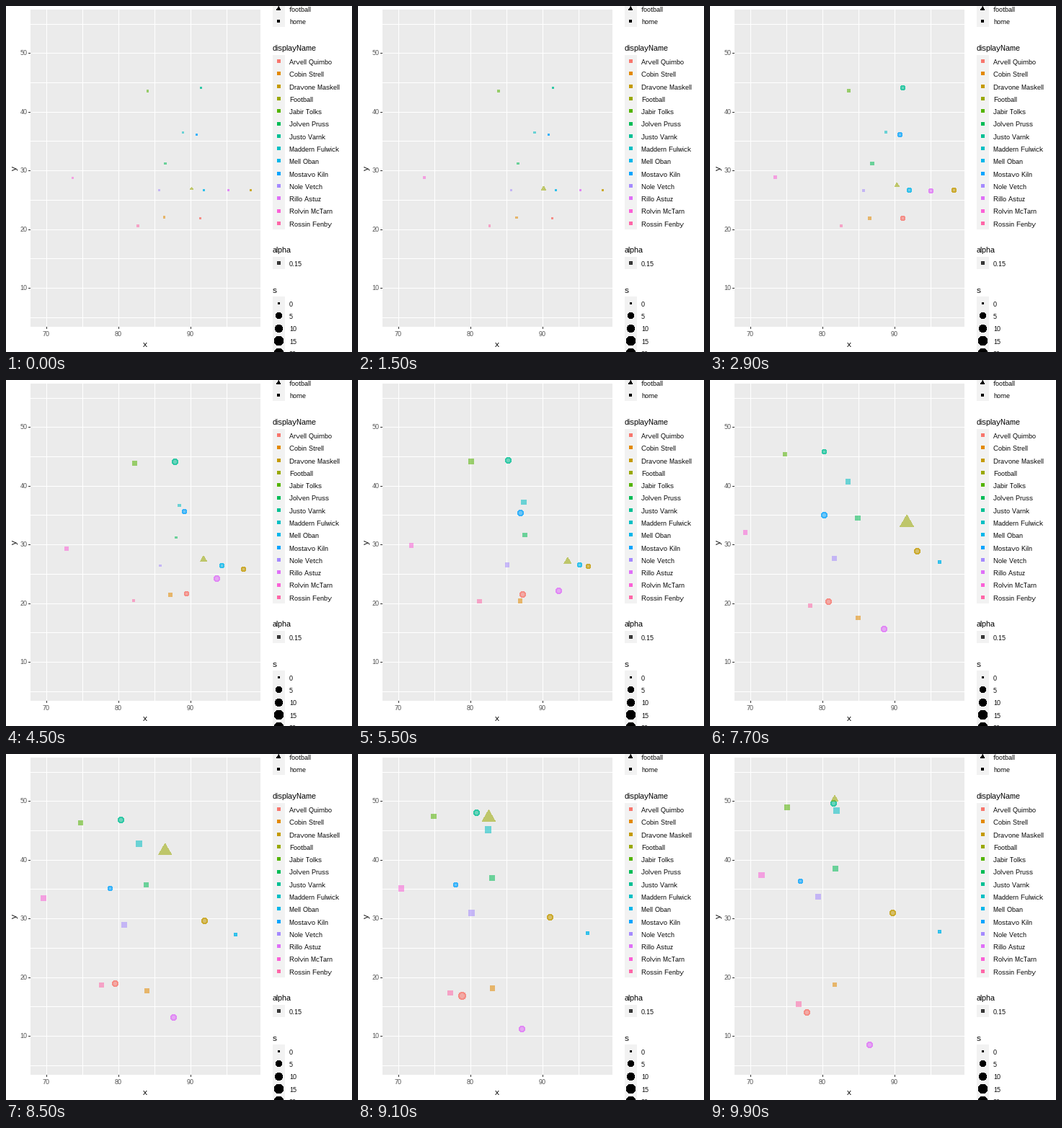
Animation of 480 by 480 pixels, one loop 10000 ms. Source, as a matplotlib script:

```python
import numpy as np
import matplotlib.pyplot as plt
from matplotlib.animation import FuncAnimation
from matplotlib.patches import Circle, Polygon, Rectangle
from matplotlib.transforms import Affine2D

plt.rcParams.update({"font.family": "Liberation Sans",
                     "text.hinting": "native", "text.hinting_factor": 1})

SIZE, DPI = 480, 80
PX = 72 / DPI              # points per pixel
STEPS = 50                 # motion steps in one loop
TOP_SPEED = 23             # speed drawn at the largest size
YARD = np.array([10, 8.14])  # pixels per yard along x and y

fig = plt.figure(figsize=(SIZE / DPI, SIZE / DPI), dpi=DPI, facecolor="white")
ax = fig.add_axes([0, 0, 1, 1])
ax.set(xlim=(0, SIZE), ylim=(SIZE, 0))
ax.axis("off")

COLORS = ["#F8766D", "#E38900", "#C49A00", "#99A800", "#53B400",
          "#00BC56", "#00C094", "#00BFC4", "#00B6EB", "#06A4FF",
          "#A58AFF", "#DF70F8", "#FB61D7", "#FF66A8"]

# Each route: line-up, break, cut and finish
START, KEYS = 13, [23, 40, 50]
PLAYERS = [
    ("Arvell Quimbo", "away", (269, 294), (250, 296), (161, 309), (134, 358)),
    ("Cobin Strell", "home", (219.5, 293), (228, 298), (203.5, 330), (173, 320)),
    ("Dravone Maskell", "away", (339, 255), (329, 262), (285, 236), (253, 220)),
    ("Football", "football"),
    ("Jabir Tolks", "home", (196.5, 118), (178.5, 115.5), (103, 102), (107, 74)),
    ("Jolven Pruss", "home", (221, 218.5), (236, 218.5), (202.5, 189.5), (174, 159)),
    ("Justo Varnk", "away", (270, 113), (234, 113), (158, 98), (171, 68)),
    ("Maddern Fulwick", "home", (245.5, 175.5), (240.5, 174), (189.5, 138), (175.5, 78.5)),
    ("Mell Oban", "away", (274, 255), (299, 257), (319, 252), (318, 246)),
    ("Mostavo Kiln", "away", (264, 178), (247, 182), (154, 188), (125, 176)),
    ("Nole Vetch", "home", (212.5, 255.5), (214, 257.5), (170, 246), (150, 198)),
    ("Rillo Astuz", "away", (308, 255), (292, 275), (239, 350), (221, 403)),
    ("Rolvin McTarn", "home", (92.5, 238.5), (84, 234), (48.5, 209.5), (71.5, 168)),
    ("Rossin Fenby", "home", (183, 305), (177, 306), (137, 314), (123, 347)),
]
PASSER, RECEIVER = "Mell Oban", "Justo Varnk"
SPOT, SNAP, HELD, THROW, CATCH = (257.5, 253.5), 8, 33, 35.5, 47


def glide(keys, points):
    """Monotone cubic path through the points, sampled at every step."""
    t, p = np.array(keys, float), np.array(points, float)
    h = np.diff(t)[:, None]
    d = np.diff(p, axis=0) / h
    m = np.vstack([d[:1], np.zeros_like(d[1:]), d[-1:]])
    a, b = 2 * h[1:] + h[:-1], h[1:] + 2 * h[:-1]
    same = d[:-1] * d[1:] > 0
    d0, d1 = np.where(same, d[:-1], 1), np.where(same, d[1:], 1)
    m[1:-1] = np.where(same, (a + b) / (a / d0 + b / d1), 0)

    s = np.arange(STEPS + 1)
    k = np.clip(np.searchsorted(t, s, "right") - 1, 0, len(h) - 1)
    u = (s - t[k])[:, None] / h[k]
    return ((1 + 2 * u) * (1 - u) ** 2 * p[k] + u * (1 - u) ** 2 * h[k] * m[k]
            + u * u * (3 - 2 * u) * p[k + 1] + u * u * (u - 1) * h[k] * m[k + 1])


def route(team, points):
    # Attackers wait for the snap, defenders drift a little
    p = np.array(points, float)
    drift = 0.15 if team == "home" else 0
    ready = p[0] + drift * (p[1] - p[0])
    return glide([0, START] + KEYS, np.vstack([p[:1], [ready], p[1:]]))


def ball_path(passer, receiver):
    s = np.arange(STEPS + 1)
    u = np.clip((s - SNAP) / (HELD - SNAP), 0, 1)[:, None]
    held = SPOT + (passer - SPOT) * u ** 1.8 - np.sin(np.pi * u) * [0, 6]
    fly = np.clip((s - THROW) / (CATCH - THROW), 0, 1)[:, None]
    goal = receiver[np.maximum(s, CATCH)] + [2, -5]
    return held + (goal - held) * fly


def mm_radius(mm):
    return 0.375 * (2.845 * mm + 0.945)


def speed_radius(speed):
    return mm_radius(1 + 5 * np.sqrt(np.clip(speed / TOP_SPEED, 0, 1)))


def place(marks, x, y, r):
    sizes = [r]
    if len(marks) == 2:  # discs sit on whole pixels
        x, y, r = np.floor(x) + 0.5, np.floor(y) + 0.5, np.round(r)
        sizes = [r + 0.15, r - 0.35]
    for mark, size in zip(marks, sizes):
        mark.set_transform(Affine2D().scale(size).translate(x, y) + ax.transData)


def marker(team, color, x, y, r, alpha=1, z=3):
    if team == "home":
        marks = [Rectangle((-1, -1), 2, 2, fc=color, ec="none")]
    elif team == "football":
        marks = [Polygon([(0, -1.555), (1.347, 0.778), (-1.347, 0.778)],
                         fc=color, ec="none")]
    else:
        marks = [Circle((0, 0), 1, fc=color, ec="none"),
                 Circle((0, 0), 1, fill=False, ec=color, lw=PX)]
    for mark in marks:
        mark.set(alpha=alpha, zorder=z, antialiased=False)
        ax.add_patch(mark)
    place(marks, x, y, r)
    return marks


def box(x, y, w, h, color):
    ax.add_patch(Rectangle((x, y), w, h, fc=color, ec="none",
                           antialiased=False, zorder=1))


def text(x, y, s, px=9.4, color="black", **kw):
    ax.text(x, y, s, fontsize=px * PX, color=color, **kw)


def key_row(y, label):
    text(393, y + 3.6, label)


# Panel, grid and axes
L, T, W, H = 34, 5, 319, 440
box(L, T, W, H, "#EBEBEB")
for i in range(6):
    x = 56 + 50 * i
    box(x, T, 1, H, "white")
    if i % 2 == 0:
        box(x, T + H, 1, 3, "#333333")
        text(x, 458.5, 70 + 5 * i, 9, "#4D4D4D", ha="center")
for i in range(11):
    y = int(432.1 - 5 * YARD[1] * i)
    box(L, y, W, 1, "white")
    if i % 2:
        box(L - 3, y, 3, 1, "#333333")
        text(29.5, y + 3.3, 5 + 5 * i, 9, "#4D4D4D", ha="right")
text(193, 473, "x", 11, ha="center")
text(12, 225, "y", 11, ha="center", va="center", rotation=90)

# Legends
KX, ROW = 378.2, 17.28
for y, h in [(0, 29), (68, 242), (348, 17), (403, 77)]:
    box(370, y, 17, h, "#F2F2F2")
for y, title in [(62, "displayName"), (342, "alpha"), (398, "s")]:
    text(370, y, title, 10.7)

dot = mm_radius(1.5)
for y, team in [(4, "football"), (21, "home")]:
    marker(team, "black", KX, y, dot)
    key_row(y + 0.5, team)
for i, (name, *_) in enumerate(PLAYERS):
    y = 76.7 + ROW * i
    marker("away", COLORS[i], KX, y, dot)
    key_row(y + 0.7, name)
marker("away", "black", KX, 356.5, dot, 0.55)
key_row(357, "0.15")
for i in range(5):
    y = 412.5 + ROW * i
    marker("away", "black", KX, y, speed_radius(5 * i))
    key_row(y + 0.6, 5 * i)

# Moving points, sized by their speed
paths = {name: route(team, pts) for name, team, *pts in PLAYERS if pts}
paths["Football"] = ball_path(paths[PASSER], paths[RECEIVER])
tracks = []
for (name, team, *_), color in zip(PLAYERS, COLORS):
    pos = paths[name]
    speed = np.hypot(*(np.gradient(pos, axis=0) / YARD).T) * 10
    radii = speed_radius(speed)
    z = 5 if team == "football" else 4
    tracks.append((marker(team, color, *pos[0], radii[0], 0.55, z), pos, radii))


def update(frame):
    step = (frame + 1) // 2
    for marks, pos, radii in tracks:
        place(marks, *pos[step], radii[step])
    return [mark for marks, _, _ in tracks for mark in marks]


anim = FuncAnimation(fig, update, frames=2 * STEPS, interval=100,
                     repeat=True, repeat_delay=0, blit=False)
plt.show()
```
